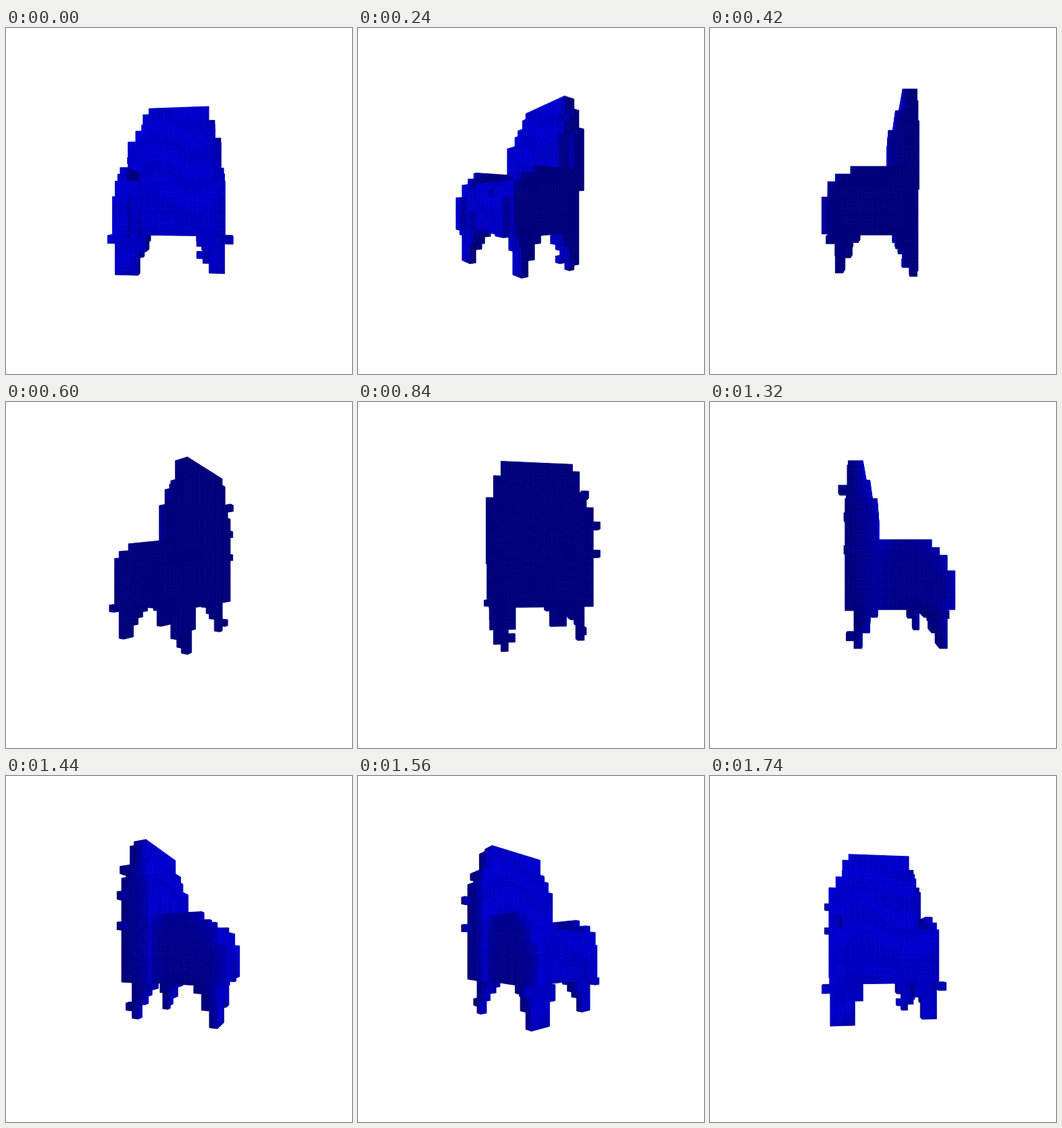
Recreate the animation shown at these times as an HTML page with a canvas. Size 512 by 512 pixels, loop 1800 ms.

```html
<!DOCTYPE html>
<html lang="en">
<head>
<meta charset="utf-8">
<title>Turning armchair</title>
<style>
  html, body { margin: 0; width: 100%; height: 100%; overflow: hidden; background: #fff; }
  canvas { display: block; }
</style>
</head>
<body>
<canvas id="stage" width="512" height="512"></canvas>
<script>
const STEP_MS = 60, STEPS = 30, START_DEG = 6;
const VOXEL = 9.5, ORIGIN = [-3.5, -89, -45];
const CENTER_X = 256, HORIZON = 257, CAMERA = 400;
const LIGHT = [-0.2, 0.25, 0.94], DARK = 122, GAIN = 90;
const SPLIT = 2; // patches per voxel edge

const clamp = (v, lo, hi) => Math.min(hi, Math.max(lo, v));

// All shapes are in voxels: x to the right, y up, z to the front.
function inBack(x, y, z) {
  const taper = clamp((y - 18) / 6, 0, 1);
  const left = -8 + 2.6 * taper;
  const right = (y < 11 ? 6 : 7) - 2 * taper - z / 3;
  return y > 5 && y < 25 && x > left && x < right + 0.3 && z > 0 && z < 4 - 2.4 * taper;
}

function inSeat(x, y, z) {
  const top = x < -6 || x > 6 ? 14 : 12;
  const skew = (x + 7) / 14;
  const bulge = 0.15 * Math.max(0, y - 9) ** 2;
  const recess = Math.abs(x) < 4 && y < 8 ? 1 : 0;
  const front = 13.7 - bulge - 1.3 * skew - recess;
  return Math.abs(x) < 7 && y > 5 && y < top && z > 2 && z < front;
}

// Legs widen towards the middle of the seat as they rise
const legs = [
  { x: -7, z: 12, width: 3, foot: 0 },
  { x: 5, z: 10, width: 2, foot: 0 },
  { x: 4, z: 0, width: 1, foot: -1 },
  { x: -7, z: 1, width: 1, foot: 0 }
];
function inLeg({ x: x0, z: z0, width, foot }, x, y, z) {
  if (y < foot || y > 5) return false;
  const rise = y - 0.5 - foot;
  const inner = Math.floor(rise / 3), deep = Math.floor(rise / 2);
  const outer = rise >= 1 ? 1 : 0;
  const lo = Math.max(-7, x0 - (x0 < 0 ? outer : inner));
  const hi = Math.min(7, x0 + width + (x0 < 0 ? inner : outer));
  const near = z0 + 1 + (z0 < 6 ? deep : 0);
  const far = z0 - (z0 < 6 ? 0 : deep);
  return x > lo && x < hi && z > far && z < near;
}

// Single voxels that stick out
const knobs = [[-9, 12, 0], [-9, 16, 0], [-7, 20, -1], [-8, 4, 12], [7, 4, 11], [-7, 1, 0], [3, 0, 1]];

const solid = new Set();
const key = (x, y, z) => ((x + 20) * 64 + y + 20) * 64 + z + 20;
const voxels = [];
function addVoxel(x, y, z) {
  solid.add(key(x, y, z));
  voxels.push([x, y, z]);
}
for (let x = -9; x < 9; x++)
  for (let y = -2; y < 26; y++)
    for (let z = 0; z < 15; z++) {
      const p = [x + 0.5, y + 0.5, z + 0.5];
      if (inBack(...p) || inSeat(...p) || legs.some(leg => inLeg(leg, ...p))) addVoxel(x, y, z);
    }
knobs.forEach(k => solid.has(key(...k)) || addVoxel(...k));

// Outward direction of the softened solid around a point
function softNormal(p) {
  const base = p.map(Math.floor), sum = [0, 0, 0];
  for (let x = base[0] - 2; x <= base[0] + 2; x++)
    for (let y = base[1] - 2; y <= base[1] + 2; y++)
      for (let z = base[2] - 2; z <= base[2] + 2; z++) {
        if (!solid.has(key(x, y, z))) continue;
        const d = [p[0] - x - 0.5, p[1] - y - 0.5, p[2] - z - 0.5];
        const weight = Math.exp(-(d[0] ** 2 + d[1] ** 2 + d[2] ** 2) / 2);
        d.forEach((v, i) => sum[i] += v * weight);
      }
  const length = Math.hypot(...sum) || 1;
  return sum.map(v => v / length);
}

// The light turns with the chair, so each shade is fixed
function shade(p, axis, dir) {
  const n = softNormal(p);
  n[axis] += 0.7 * dir;
  const lit = n.reduce((s, v, i) => s + v * LIGHT[i], 0) / Math.hypot(...n);
  const crease = 0.92 + 0.08 * Math.sin(p[1] * 1.3 + 2 * Math.sin(p[0] * 0.5));
  return `rgb(0,0,${Math.round(DARK + GAIN * Math.max(0, lit) * crease)})`;
}

const points = new Map();
function pointAt(p) {
  const id = p.map(v => Math.round(v * SPLIT)).join();
  if (!points.has(id)) points.set(id, { pos: p.map((v, i) => v * VOXEL + ORIGIN[i]) });
  return points.get(id);
}

const faces = [];
function addFace(voxel, axis, dir) {
  const b = (axis + 1) % 3, c = (axis + 2) % 3, size = 1 / SPLIT;
  for (let i = 0; i < SPLIT; i++)
    for (let j = 0; j < SPLIT; j++) {
      const spot = (db, dc) => {
        const p = voxel.slice();
        if (dir > 0) p[axis]++;
        p[b] += (i + db) * size;
        p[c] += (j + dc) * size;
        return p;
      };
      const corners = [[0, 0], [1, 0], [1, 1], [0, 1]].map(d => pointAt(spot(...d)));
      if (dir < 0) corners.reverse();
      faces.push({ corners, color: shade(spot(0.5, 0.5), axis, dir) });
    }
}
for (const voxel of voxels)
  for (let axis = 0; axis < 3; axis++)
    for (const dir of [-1, 1]) {
      const next = voxel.slice();
      next[axis] += dir;
      if (!solid.has(key(...next))) addFace(voxel, axis, dir);
    }

const ctx = document.getElementById("stage").getContext("2d");
ctx.lineWidth = 0.8;
ctx.lineJoin = "round";

function draw(step) {
  const angle = (START_DEG + step * 360 / STEPS) * Math.PI / 180;
  const cos = Math.cos(angle), sin = Math.sin(angle);
  for (const v of points.values()) {
    const [x, y, z] = v.pos;
    v.w = x * sin + z * cos;
    const scale = CAMERA / (CAMERA - v.w);
    v.x = CENTER_X + (x * cos - z * sin) * scale;
    v.y = HORIZON - y * scale;
  }
  const visible = faces.filter(({ corners: [a, b, c, d] }) =>
    (c.x - a.x) * (d.y - b.y) - (c.y - a.y) * (d.x - b.x) < 0);
  for (const face of visible) face.depth = face.corners.reduce((s, v) => s + v.w, 0);
  visible.sort((a, b) => a.depth - b.depth);

  ctx.fillStyle = "#fff";
  ctx.fillRect(0, 0, 512, 512);
  for (const { corners, color } of visible) {
    ctx.fillStyle = ctx.strokeStyle = color;
    ctx.beginPath();
    corners.forEach(v => ctx.lineTo(v.x, v.y));
    ctx.closePath();
    ctx.fill();
    ctx.stroke();
  }
}

const start = performance.now();
let shown = -1;
function tick() {
  const step = Math.floor((performance.now() - start) / STEP_MS) % STEPS;
  if (step !== shown) draw(shown = step);
  requestAnimationFrame(tick);
}
tick();
</script>
</body>
</html>
```
